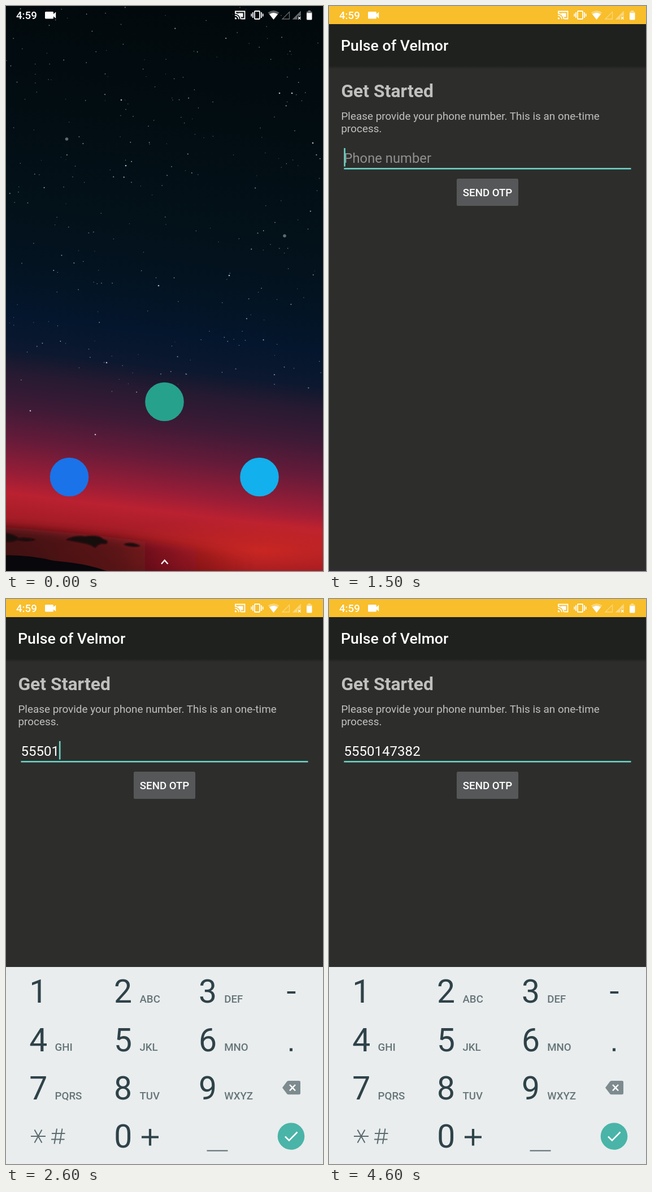
An HTML page for the animation above (5.1 s loop, 561x998 px).

```html
<!DOCTYPE html>
<html lang="en">
<head>
<meta charset="utf-8">
<title>Phone sign-in</title>
<style>
  html, body { margin: 0; width: 100%; height: 100%; overflow: hidden; background: #000; }
  svg { display: block; width: 100vw; height: 100vh; font-family: Roboto, Arial, sans-serif; }
  text { white-space: pre; }
</style>
</head>
<body>
<svg id="stage" viewBox="0 0 561 998">
  <defs>
    <linearGradient id="sky" gradientUnits="userSpaceOnUse" x1="280" y1="0" x2="162" y2="984">
      <stop offset="0" stop-color="#02090c"/>
      <stop offset=".2" stop-color="#020d12"/>
      <stop offset=".38" stop-color="#031119"/>
      <stop offset=".48" stop-color="#031320"/>
      <stop offset=".58" stop-color="#04162d"/>
      <stop offset=".64" stop-color="#0c182f"/>
      <stop offset=".68" stop-color="#251a31"/>
      <stop offset=".74" stop-color="#3e1a36"/>
      <stop offset=".8" stop-color="#651b39"/>
      <stop offset=".86" stop-color="#981d37"/>
      <stop offset=".895" stop-color="#ba2131"/>
      <stop offset=".93" stop-color="#a91d28"/>
      <stop offset="1" stop-color="#8c161b"/>
    </linearGradient>
    <radialGradient id="glow">
      <stop offset="0" stop-color="#cf2822" stop-opacity=".85"/>
      <stop offset="1" stop-color="#cf2822" stop-opacity="0"/>
    </radialGradient>
    <linearGradient id="dusk" x2="1" y2="0">
      <stop offset="0" stop-color="#2c0a12" stop-opacity=".85"/>
      <stop offset=".5" stop-color="#3a0c13" stop-opacity=".65"/>
      <stop offset="1" stop-color="#4a0e14" stop-opacity="0"/>
    </linearGradient>
    <linearGradient id="shade" x2="0" y2="1">
      <stop offset="0" stop-color="#000" stop-opacity=".25"/>
      <stop offset="1" stop-color="#000" stop-opacity="0"/>
    </linearGradient>
    <filter id="soft"><feGaussianBlur stdDeviation="1.2"/></filter>
    <filter id="haze"><feGaussianBlur stdDeviation="9"/></filter>
    <clipPath id="reveal"><rect id="window"/></clipPath>
  </defs>

  <g id="home">
    <rect width="561" height="998" fill="url(#sky)"/>
    <ellipse cx="450" cy="962" rx="290" ry="60" fill="url(#glow)"/>
    <path d="M-40 918Q160 930 440 972V1040H-40Z" fill="url(#dusk)" filter="url(#haze)"/>
    <g id="stars"></g>
    <g fill="#12070c" filter="url(#soft)">
      <path d="M0 931Q14 934 22 940Q40 938 53 943Q35 947 20 943Q8 948 0 946Z"/>
      <path d="M106 943Q122 934 140 937Q164 933 172 942Q184 945 177 950Q163 948 158 957Q150 951 138 949Q122 946 106 943Z"/>
      <path d="M208 951Q221 945 238 954Q222 957 208 951Z"/>
    </g>
    <path d="M0 970Q45 970 85 980Q140 984 178 998H0Z" fill="#08070b"/>
    <circle cx="280.5" cy="699" r="34.3" fill="#26a18c"/>
    <circle cx="112" cy="832" r="34.3" fill="#1a73e8"/>
    <circle cx="448.5" cy="832" r="34.3" fill="#12b0ec"/>
    <path d="M275 985.5L280.7 979L286.5 985.5" fill="none" stroke="#fff" stroke-width="2.4"/>
  </g>

  <g id="app" clip-path="url(#reveal)">
    <g id="page">
      <rect width="561" height="998" fill="#2d2e2c"/>
      <rect y="-120" width="561" height="152" fill="#f8be2c"/>
      <rect y="32" width="561" height="74.5" fill="#1f211e"/>
      <rect y="106.5" width="561" height="5" fill="url(#shade)"/>
      <text x="21" y="79" font-size="26.7" font-weight="500" fill="#fff">Pulse of Velmor</text>
      <text x="21.4" y="161" font-size="31.9" font-weight="700" fill="#c0c0bf">Get Started</text>
      <g font-size="18.9" fill="#c0c0bf">
        <text x="21.4" y="201">Please provide your phone number. This is an one-time</text>
        <text x="21.4" y="223">process.</text>
      </g>
      <text id="field" x="26.5" y="277"></text>
      <rect id="underline" x="26.5" width="508"/>
      <rect id="caret" y="251" width="2.6" height="32.5" fill="#6ad3c5"/>
      <rect x="226" y="305" width="109" height="48" rx="2.6" fill="#565758"/>
      <text x="280.5" y="336.3" font-size="18.7" font-weight="500" fill="#fff" text-anchor="middle">SEND OTP</text>
      <rect y="995" width="561" height="3" fill="#322b35"/>
    </g>
  </g>

  <g id="keyboard">
    <rect y="650" width="561" height="400" fill="#e9eded"/>
    <g id="keys"></g>
    <g fill="#2f4249">
      <rect x="497.6" y="693" width="14.6" height="4"/>
      <rect x="502" y="793.5" width="5" height="5.2"/>
    </g>
    <path d="M240 950.5H270M255 936V965.5" stroke="#2f4249" stroke-width="4.2"/>
    <path d="M44 949H70M50.5 937.5L63.5 960.5M63.5 937.5L50.5 960.5M81 944H104.5M80 954.5H103.5M90 935.5L85.5 962.5M99.5 935.5L95 962.5M355.5 974.5H392.5"
          fill="none" stroke="#5b6b70" stroke-width="2"/>
    <path d="M489 863.2L497 852.5Q498 851 500 851H518.5Q521 851 521 853.5V873Q521 875.3 518.5 875.3H500Q498 875.3 497 873.8Z" fill="#7d8b8f"/>
    <path d="M502 858L512 868.5M512 858L502 868.5" stroke="#fff" stroke-width="2.5"/>
    <circle cx="504.5" cy="949" r="23.8" fill="#4ab4a8"/>
    <path d="M494 949.5L501 956.5L515.5 941.5" fill="none" stroke="#fff" stroke-width="2.6"/>
  </g>

  <g id="status" fill="#fff">
    <text x="18" y="23.3" font-size="18.7" font-weight="500">4:59</text>
    <path d="M70.5 10H82.5Q84 10 84 11.5V14.3L88.2 10.5V22L84 18.2V21Q84 22.5 82.5 22.5H70.5Q69 22.5 69 21V11.5Q69 10 70.5 10Z"/>
    <g fill="none" stroke="#fff" stroke-width="1.8">
      <path d="M406 13V9.5H422.5V22.5H416.5M405 16.3A6.8 6.8 0 0 1 412 23.3M405 12.8A10.5 10.5 0 0 1 415.5 23.3"/>
      <rect x="440" y="9" width="9" height="14" rx="1"/>
      <path d="M437 11V21M434.3 13.5V18.5M452 11V21M454.7 13.5V18.5"/>
    </g>
    <path d="M405 20A3.3 3.3 0 0 1 408.3 23.3H405ZM411 12.5H419.5V19.5H416Q414.5 15.5 411 14.5Z"/>
    <path d="M463.5 11.5Q473.5 4.5 483.5 11.5L473.5 24Z" opacity=".35"/>
    <path d="M466 14.6Q473.5 9.5 481 14.6L473.5 24Z"/>
    <path d="M489 23H501.5V10.5Z" fill="none" stroke="#fff" stroke-width="1.3" opacity=".4"/>
    <path d="M506.5 23.7L521.8 8.4V17.5H515.5V23.7Z" opacity=".4"/>
    <path d="M517 19L521.5 23.5M521.5 19L517 23.5" stroke="#fff" stroke-width="1.5"/>
    <path d="M534.5 8H539V10H534.5Z" opacity=".5"/>
    <path d="M532 9.8H541.5V12.5H532Z" opacity=".4"/>
    <path d="M532 12.3H541.5V23Q541.5 24.5 540 24.5H533.5Q532 24.5 532 23Z"/>
  </g>
</svg>

<script>
const LOOP = 5100, STEP = 100;
const OPEN_AT = 377, OPEN_MS = 400;
const FOCUS_AT = 1300, CARET_AT = 1400, BLINK = 500;
const KEYBOARD_AT = 1550, KEYBOARD_MS = 150;
const NUMBER = '5550147382';
const TYPED_AT = [2000, 2200, 2300, 2500, 2600, 2700, 2800, 2900, 3000, 3100];
const DIGIT_WIDTH = 13.5;
const REVEAL_FROM = { left: 246, right: 315, top: 685, bottom: 753 };

const $ = id => document.getElementById(id);
const set = (id, attrs) => {
  for (const name in attrs) $(id).setAttribute(name, attrs[name]);
};
const clamp = x => Math.min(1, Math.max(0, x));
const lerp = (a, b, k) => a + (b - a) * k;

// Cubic bezier easing, solved by bisection.
function bezier(x1, y1, x2, y2) {
  const at = (a, b, s) => 3 * (1 - s) ** 2 * s * a + 3 * (1 - s) * s * s * b + s ** 3;
  return x => {
    if (x <= 0 || x >= 1) return clamp(x);
    let low = 0, high = 1;
    for (let i = 0; i < 24; i++) {
      const mid = (low + high) / 2;
      if (at(x1, x2, mid) < x) low = mid; else high = mid;
    }
    return at(y1, y2, low);
  };
}
const easeVertical = bezier(.3, 0, .1, 1);
const easeHorizontal = bezier(0, 0, .4, 1);
const easeOut = bezier(0, 0, .2, 1);

function drawStars() {
  let seed = 459;
  const random = () => (seed = (seed * 16807) % 2147483647) / 2147483647;
  const star = (x, y, r, opacity) =>
    `<circle cx="${x.toFixed(1)}" cy="${y.toFixed(1)}" r="${r.toFixed(2)}" fill="#cfdbe2" opacity="${opacity.toFixed(2)}"/>`;
  let out = '';
  for (let i = 0; i < 280; i++) {
    const y = 690 * random();
    out += star(561 * random(), y, .6 + .5 * random() ** 2, .3 + .55 * random());
  }
  const bright = [[204, 166], [484, 154], [506, 154], [270, 494], [178, 630], [543, 242], [395, 476], [212, 282], [43, 715], [158, 757]];
  for (const [x, y] of bright) out += star(x, y, 1.3, .85);
  for (const [x, y] of [[107.5, 235], [493, 406]]) out += star(x, y, 2.8, .45);
  $('stars').innerHTML = out;
}

function drawKeys() {
  const letters = ['', 'ABC', 'DEF', 'GHI', 'JKL', 'MNO', 'PQRS', 'TUV', 'WXYZ'];
  const digit = (x, y, label) => `<text x="${x}" y="${y}" font-size="57" fill="#2f4249">${label}</text>`;
  let out = digit(191.3, 969.4, 0);
  letters.forEach((label, i) => {
    const x = 41.3 + 149.8 * (i % 3), y = 713 + 85.5 * Math.floor(i / 3);
    out += digit(x, y, i + 1);
    out += `<text x="${x + 45.3}" y="${y - .5}" font-size="18.7" font-weight="500" fill="#667579">${label}</text>`;
  });
  $('keys').innerHTML = out;
}

function renderWindow(t) {
  const k = clamp((t - OPEN_AT) / OPEN_MS);
  const v = easeVertical(k), h = easeHorizontal(clamp(k * 1.75));
  const left = Math.round(lerp(REVEAL_FROM.left, 0, h));
  const right = Math.round(lerp(REVEAL_FROM.right, 561, h));
  const top = Math.round(lerp(REVEAL_FROM.top, 0, v));
  const bottom = Math.round(lerp(REVEAL_FROM.bottom, 998, v));
  set('window', { x: left, y: top, width: right - left, height: bottom - top });
  set('page', { transform: `translate(0 ${lerp(110, 0, easeOut(k))})` });
  set('app', { opacity: clamp((t - OPEN_AT) / 83) });
}

function renderField(t) {
  const count = TYPED_AT.filter(at => t >= at).length;
  const focused = t >= FOCUS_AT;
  const blinkFrom = count ? TYPED_AT[count - 1] : CARET_AT;
  const caretOn = t >= CARET_AT && Math.floor((t - blinkFrom) / BLINK) % 2 === 0;
  $('field').textContent = count ? NUMBER.slice(0, count) : 'Phone number';
  set('field', count
    ? { fill: '#fff', 'font-size': 24.05 }
    : { fill: '#8f908f', 'font-size': 23.8 });
  set('underline', focused
    ? { y: 286, height: 2.6, fill: '#6ad3c5' }
    : { y: 286.2, height: 1.4, fill: '#c0c0bf' });
  set('caret', { x: 26.4 + count * DIGIT_WIDTH, visibility: caretOn ? 'visible' : 'hidden' });
}

function renderKeyboard(t) {
  const k = easeOut(clamp((t - KEYBOARD_AT) / KEYBOARD_MS));
  set('keyboard', { opacity: k, transform: `translate(0 ${lerp(100, 0, k)})` });
}

function render(time) {
  const t = Math.floor((time % LOOP) / STEP) * STEP;
  renderWindow(t);
  renderField(t);
  renderKeyboard(t);
}

drawStars();
drawKeys();
render(0);
const start = performance.now();
requestAnimationFrame(function tick() {
  render(performance.now() - start);
  requestAnimationFrame(tick);
});
</script>
</body>
</html>
```
